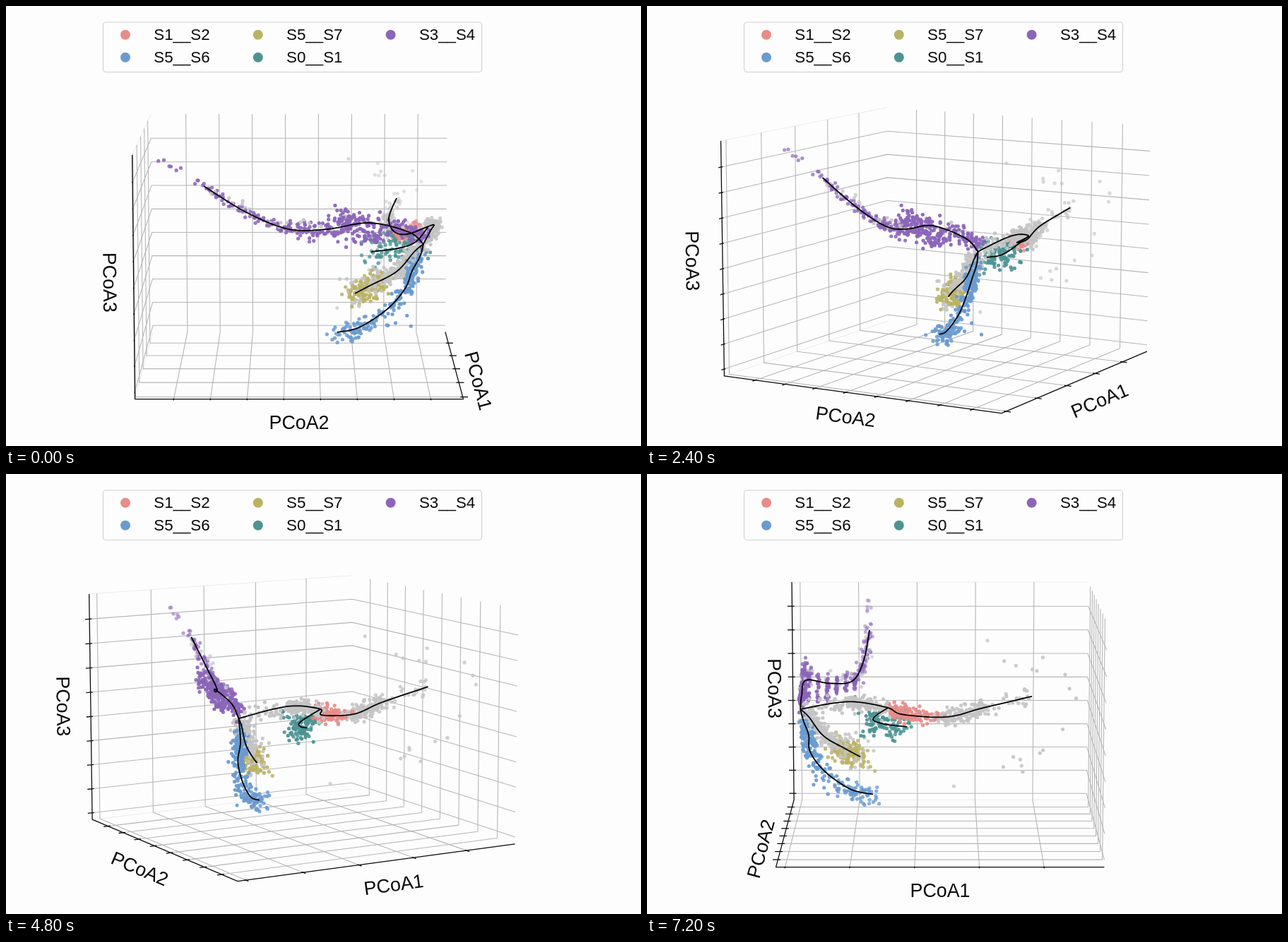
An HTML page with a canvas for the animation above (8 s loop, 899 by 623 pixels).

```html
<!DOCTYPE html>
<html lang="en">
<head>
<meta charset="utf-8">
<title>Rotating PCoA plot</title>
<style>
  html, body { margin: 0; width: 100%; height: 100%; overflow: hidden; background: #fdfdfd; }
  canvas { display: block; }
</style>
</head>
<body>
<canvas id="stage" width="899" height="623"></canvas>
<script>
const ctx = document.getElementById('stage').getContext('2d');
const FONT = '"Liberation Sans", Arial, sans-serif';
const COLORS = {
  salmon: '#e78c88', blue: '#6a9bd0', olive: '#bab263',
  teal: '#4d9393', purple: '#8b65b8', gray: '#c4c4c4'
};
const INK = '#0a0a0a';
const STEP_MS = 800, STEPS = 10;

// Perspective camera: p runs right, q towards the viewer, z up at turn 0.
const CX = 415, CY = 344.5, FOCAL = 3707, DIST = 10;
const TILT = Math.PI / 18, SIN = Math.sin(TILT), COS = Math.cos(TILT);
const A = 0.5952, C = 0.75 * A;
let turnSin = 0, turnCos = 1;

function project([p, q, z]) {
  const side = p * turnCos - q * turnSin;
  const near = q * turnCos + p * turnSin;
  const depth = DIST - near * COS - z * SIN;
  return {
    x: CX + FOCAL * side / depth,
    y: CY - FOCAL * (z * COS - near * SIN) / depth,
    near, depth
  };
}

// Finds the 3D point seen at (x, y) at turn 0 and at column sideX after a quarter turn.
function lift([x, y, sideX]) {
  let p = 0, q = 0, z = 0;
  for (let i = 0; i < 8; i++) {
    const front = (DIST - q * COS - z * SIN) / FOCAL;
    const side = (DIST - p * COS - z * SIN) / FOCAL;
    p = (x - CX) * front;
    q = (CX - sideX) * side;
    z = ((CY - y) * front + q * SIN) / COS;
  }
  return [p, q, z];
}
const path = (...keys) => keys.map(lift);

// Point on a Catmull-Rom spline; t counts key points.
function along(keys, t) {
  const last = keys.length - 1;
  const i = Math.min(Math.floor(t), last - 1), f = t - i;
  const [a, b, c, d] = [i - 1, i, i + 1, i + 2].map(k => keys[Math.max(0, Math.min(last, k))]);
  return b.map((v, k) => v + f / 2 * (c[k] - a[k]
    + f * (2 * a[k] - 5 * v + 4 * c[k] - d[k] + f * (3 * (v - c[k]) + d[k] - a[k]))));
}

const fork = [591, 337, 217], knot = [598, 312, 341];
const arm = path([280, 255, 315], [340, 292, 307], [400, 316, 291], [455, 316, 258],
  [515, 307, 225], [570, 320, 219], fork);
const hook = path(fork, [586, 355, 222], [575, 375, 229], [565, 400, 231],
  [540, 429, 252], [500, 455, 288], [469, 462, 320]);
const twig = path(fork, [578, 348, 229], [553, 376, 250], [515, 396, 282], [494, 407, 302]);
const trunk = path(fork, [601, 318, 265], [606, 310, 298], knot, [568, 323, 362],
  [549, 319, 425], [542, 300, 475], [553, 272, 545]);
const loop = path(knot, [580, 334, 320], [555, 343, 335], [517, 348, 368]);
const curves = [arm, hook, twig, trunk, loop];

let seed = 20;
function random() {
  seed = (seed * 1664525 + 1013904223) % 4294967296;
  return seed / 4294967296;
}
const bell = () => (random() + random() + random() - 1.5) * 2;

const WALL = 0.517, COLUMN = 0.0325;
const dots = [];

// Scatters dots around a stretch of a curve; flat squeezes q, columns snaps it.
function cloud(color, keys, from, to, count, spread, { rise = 0, flat = 1, columns = false } = {}) {
  for (let n = 0; n < count; n++) {
    let [p, q, z] = along(keys, from + (to - from) * random());
    p += spread * bell();
    q += spread * flat * bell();
    z += spread * bell() + rise;
    if (columns) q = (Math.round(q / COLUMN) + 0.06 * bell()) * COLUMN;
    dots.push({ color, at: [p, Math.min(q, WALL - 0.012 * random()), z] });
  }
}

const armTip = path([213, 214, 316], [279, 253, 313]);
const upperSheet = path([470, 302, 224], [585, 322, 218]);
const lowerSheet = path([410, 318, 296], [530, 328, 230]);
const highStrays = path([465, 218, 466], [590, 250, 605]);
const lowStrays = path([575, 300, 595], [490, 440, 440]);

cloud('purple', armTip, 0, 1, 10, 0.006);
cloud('purple', arm, 0, 2.1, 75, 0.009);
cloud('purple', arm, 2, 4, 65, 0.017, { columns: true });
cloud('purple', upperSheet, 0, 1, 125, 0.021, { flat: 0.5 });
cloud('purple', lowerSheet, 0, 1, 75, 0.019, { columns: true });
cloud('purple', arm, 4.6, 5.8, 30, 0.013, { flat: 0.6 });
cloud('gray', arm, 0.2, 4.8, 34, 0.02, { rise: 0.01 });
cloud('blue', hook, 1, 3.2, 110, 0.013);
cloud('blue', hook, 3.2, 4.8, 50, 0.015);
cloud('blue', hook, 4.8, 6, 55, 0.019, { rise: -0.008 });
cloud('blue', hook, 4, 6, 9, 0.05);
cloud('gray', twig, 0.8, 2.8, 210, 0.016);
cloud('gray', twig, 2.6, 4, 45, 0.028);
cloud('olive', twig, 2.5, 4, 120, 0.024, { rise: -0.006 });
cloud('gray', trunk, 0, 3, 95, 0.015, { rise: -0.008 });
cloud('gray', trunk, 1.6, 3, 75, 0.011);
cloud('gray', trunk, 4.7, 6.1, 160, 0.014);
cloud('gray', trunk, 5.9, 7, 28, 0.017);
cloud('salmon', trunk, 3.3, 4.75, 130, 0.016, { rise: 0.004 });
cloud('teal', loop, 0.6, 3, 110, 0.028, { rise: 0.002 });
cloud('gray', highStrays, 0, 1, 9, 0.025);
cloud('gray', lowStrays, 0, 1, 9, 0.035);

const ticks = (start, gap, count) => Array.from({ length: count }, (_, i) => start + gap * i);
const pTicks = ticks(-0.4547, 0.1331, 8);
const qTicks = ticks(0.562, -0.2347, 5);
const zTicks = ticks(-0.4194, 0.096, 9);

function line(points, color, width) {
  ctx.beginPath();
  for (const point of points) {
    const { x, y } = project(point);
    ctx.lineTo(x, y);
  }
  ctx.strokeStyle = color;
  ctx.lineWidth = width;
  ctx.stroke();
}

function drawGrid() {
  for (const z of [C, -C]) line([[-A, A, z], [-A, -A, z]], '#ececec', 1);
  const grid = points => line(points, '#b6b6b6', 1.1);
  for (const p of pTicks) grid([[p, A, -C], [p, -A, -C], [p, -A, C]]);
  for (const q of qTicks) grid([[A, q, -C], [-A, q, -C], [-A, q, C]]);
  for (const z of zTicks) grid([[-A, A, z], [-A, -A, z], [A, -A, z]]);
}

function axisLabel(text, anchor, start, end) {
  const a = project(start), b = project(end), at = project(anchor);
  let angle = Math.atan2(b.y - a.y, b.x - a.x);
  if (angle > Math.PI / 2) angle -= Math.PI;
  if (angle <= -Math.PI / 2) angle += Math.PI;
  ctx.save();
  ctx.translate(at.x, at.y);
  ctx.rotate(angle);
  ctx.font = '26.8px ' + FONT;
  ctx.textAlign = 'center';
  ctx.fillStyle = INK;
  ctx.fillText(text, 0, 7.8);
  ctx.restore();
}

function drawAxes() {
  const corner = [-A, A, -C], top = [-A, A, C], front = [A, A, -C], far = [A, -A, -C];
  const axis = points => line(points, INK, 1.3);
  axis([top, corner, front, far]);
  const inner = A - 0.0095, outer = A + 0.019;
  for (const p of pTicks) axis([[p, inner, -C], [p, outer, -C]]);
  for (const q of qTicks) axis([[inner, q, -C], [outer, q, -C]]);
  for (const z of zTicks) axis([[-A, inner, z], [-A, outer, z]]);
  const pad = 0.092, low = -C - 0.75 * pad, zPad = 0.083;
  axisLabel('PCoA2', [0, A + pad, low], corner, front);
  axisLabel('PCoA1', [A + pad, 0, low], front, far);
  axisLabel('PCoA3', [-A - zPad, A + zPad, 0], top, corner);
}

function disc(x, y, radius, color) {
  ctx.fillStyle = color;
  ctx.beginPath();
  ctx.arc(x, y, radius, 0, 2 * Math.PI);
  ctx.fill();
}

function drawDots() {
  const seen = dots.map(dot => ({ color: COLORS[dot.color], ...project(dot.at) }));
  seen.sort((a, b) => b.depth - a.depth);
  for (const dot of seen) {
    ctx.globalAlpha = Math.max(0.35, Math.min(0.95, 0.7 + 0.55 * dot.near));
    disc(dot.x, dot.y, 2.6, dot.color);
  }
  ctx.globalAlpha = 1;
}

function drawCurves() {
  for (const keys of curves) {
    const count = (keys.length - 1) * 8;
    line(ticks(0, 1 / 8, count + 1).map(t => along(keys, t)), '#000', 1.8);
  }
}

function drawLegend() {
  ctx.beginPath();
  ctx.roundRect(137.5, 23, 536, 70.5, 4);
  ctx.strokeStyle = '#d2d2d2';
  ctx.lineWidth = 1.2;
  ctx.stroke();
  ctx.font = '22.3px ' + FONT;
  ctx.textAlign = 'left';
  const entries = [
    ['S1__S2', 'salmon'], ['S5__S6', 'blue'], ['S5__S7', 'olive'],
    ['S0__S1', 'teal'], ['S3__S4', 'purple']
  ];
  entries.forEach(([text, color], i) => {
    const x = 169 + 187.8 * Math.floor(i / 2), y = 40.8 + 32 * (i % 2);
    disc(x, y, 7, COLORS[color]);
    ctx.fillStyle = INK;
    ctx.fillText(text, x + 40.3, y + 7.5);
  });
}

function draw(step) {
  const turn = step * Math.PI / 18;
  turnSin = Math.sin(turn);
  turnCos = Math.cos(turn);
  ctx.fillStyle = '#fdfdfd';
  ctx.fillRect(0, 0, 899, 623);
  ctx.lineJoin = 'round';
  drawGrid();
  drawAxes();
  drawDots();
  drawCurves();
  drawLegend();
}

let shown = -1;
const begin = performance.now();
function tick() {
  const step = Math.floor((performance.now() - begin) / STEP_MS) % STEPS;
  if (step !== shown) draw(shown = step);
  requestAnimationFrame(tick);
}
tick();
</script>
</body>
</html>
```
